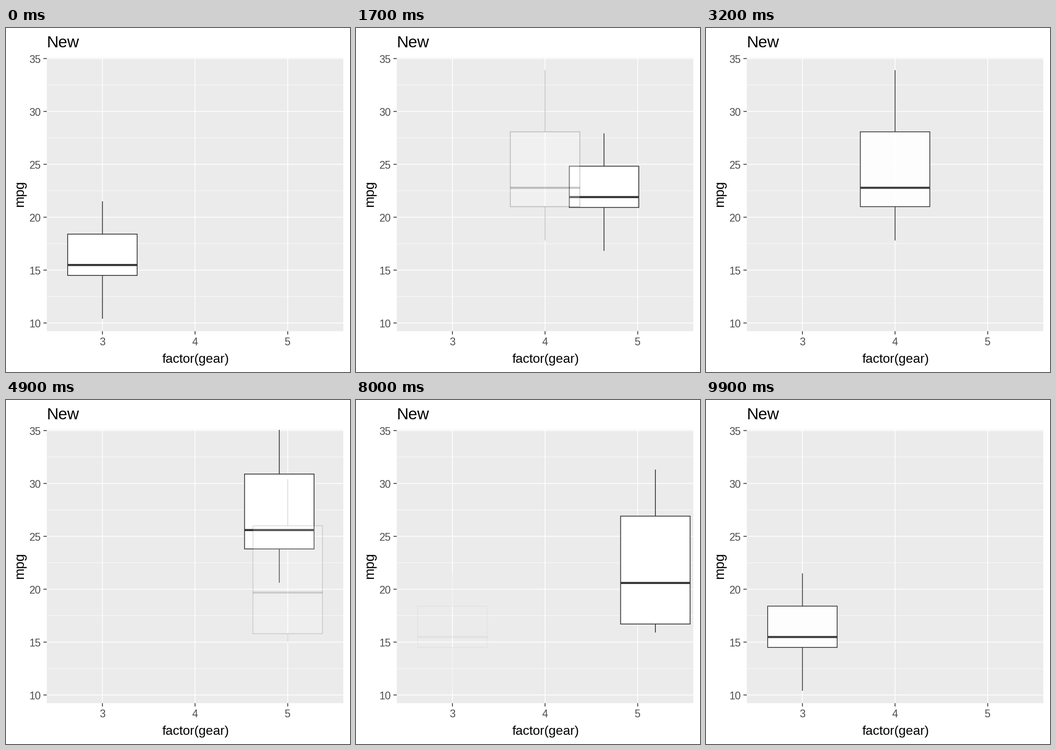
Write a matplotlib script that moves like this. It is 748x748 px and loops after 10 s.

```python
import matplotlib.pyplot as plt
from matplotlib.animation import FuncAnimation
from matplotlib.patches import Rectangle

SIZE, DPI = 748, 64
PT = 72 / DPI                                       # points per pixel
LEFT, TOP, RIGHT, BOTTOM = 88.7, 64.7, 733.3, 659.2  # panel edges
INK, LABEL, PANEL = "#333333", "#4d4d4d", "#ebebeb"
THIN, MEDIUM, THICK = 0.9, 1.75, 4.5                # stroke widths in pixels

# ymin, lower quartile, median, upper quartile, ymax for gears 3, 4, 5
STATS = [
    (10.4, 14.5, 15.5, 18.4, 21.5),
    (17.8, 21.0, 22.8, 28.075, 33.9),
    (15.0, 15.8, 19.7, 26.0, 30.4),
]
HALF = 0.375                                # half width of a box
EXIT_X, EXIT_Y = 7, 40                      # where leaving boxes fly to
MOVES = [(11, 22), (45, 22), (79, 21)]      # first frame and length

plt.rcParams["font.family"] = "Liberation Sans"


def px(x):
    return 88.8 + (x - 0.4) * 201.45


def py(y):
    return 66.45 + (35 - y) * 23


fig = plt.figure(figsize=(SIZE / DPI, SIZE / DPI), dpi=DPI, facecolor="white")
ax = fig.add_axes([0, 0, 1, 1])
ax.set_xlim(0, SIZE)
ax.set_ylim(SIZE, 0)
ax.axis("off")

panel = Rectangle((LEFT, TOP), RIGHT - LEFT, BOTTOM - TOP, fc=PANEL, lw=0,
                  snap=False)
ax.add_patch(panel)


def line(xs, ys, color, width, z=2):
    return ax.plot(xs, ys, color=color, lw=width * PT, zorder=z, snap=False,
                   solid_capstyle="butt")[0]


def label(x, y, text, size, color="black", **kw):
    ax.text(x, y, text, fontsize=size * PT, color=color, va="baseline", **kw)


for v in (12.5, 17.5, 22.5, 27.5, 32.5):
    line([LEFT, RIGHT], [py(v)] * 2, "white", THIN)
for v in range(10, 36, 5):
    y = py(v)
    line([LEFT, RIGHT], [y, y], "white", MEDIUM)
    line([81.4, LEFT], [y, y], INK, MEDIUM)
    label(76, y + 9.5, str(v), 22.9, LABEL, ha="right")
for i in (1, 2, 3):
    x = px(i)
    line([x, x], [TOP, BOTTOM], "white", MEDIUM)
    line([x, x], [BOTTOM, 666.5], INK, MEDIUM)
    label(x - 0.7, 690, str(i + 2), 22.9, LABEL, ha="center")

label(88.6, 42, "New", 35.2)
label(412, 727.5, "factor(gear)", 28.1, ha="center")
label(38.3, 360.6, "mpg", 29.4, ha="center", rotation=90,
      rotation_mode="anchor")


class Box:
    def __init__(self, z):
        self.whiskers = [line([], [], INK, MEDIUM, z) for _ in range(2)]
        self.body = Rectangle((0, 0), 1, 1, fc="white", ec=INK,
                              lw=MEDIUM * PT, zorder=z + 1, snap=False)
        ax.add_patch(self.body)
        self.median = line([], [], INK, THICK, z + 2)
        self.parts = [*self.whiskers, self.body, self.median]
        for part in self.parts:
            part.set_clip_path(panel)

    def hide(self):
        for part in self.parts:
            part.set_visible(False)

    def show(self, state, fly=0.0, alpha=1.0):
        stats = STATS[state]
        x = state + 1
        dx = fly * (EXIT_X - x)
        dy = fly * (EXIT_Y - (stats[1] + stats[3]) / 2)
        lo, q1, mid, q3, hi = (py(v + dy) for v in stats)
        x0, xc, x1 = (px(x + dx + d) for d in (-HALF, 0, HALF))
        self.whiskers[0].set_data([xc, xc], [hi, q3])
        self.whiskers[1].set_data([xc, xc], [q1, lo])
        self.body.set_bounds(x0, q3, x1 - x0, q1 - q3)
        self.median.set_data([x0, x1], [mid + 0.4, mid + 0.4])
        for part in self.parts:
            part.set_visible(True)
            part.set_alpha(alpha)


leaving, entering = Box(4), Box(8)


def draw(n):
    leaving.hide()
    entering.hide()
    state = 0
    for i, (start, length) in enumerate(MOVES):
        t = (n - start) / length
        if 0 < t < 1:
            leaving.show(i, fly=t)
            entering.show((i + 1) % 3, alpha=t)
            return leaving.parts + entering.parts
        if t >= 1:
            state = (i + 1) % 3
    leaving.show(state)
    return leaving.parts + entering.parts


anim = FuncAnimation(fig, draw, frames=100, interval=100, repeat=True,
                     repeat_delay=0, init_func=lambda: draw(0))
plt.show()
```
